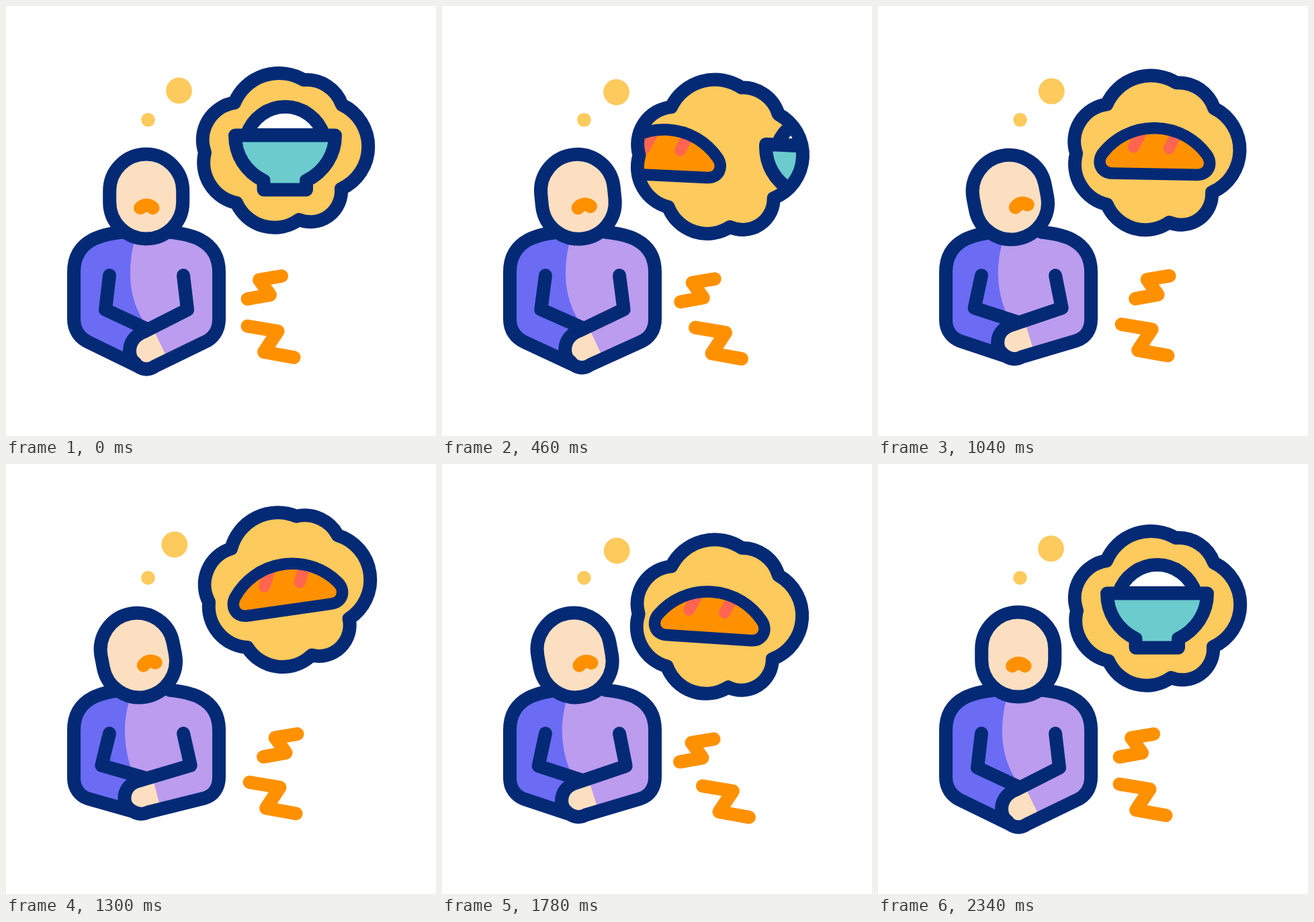
Write an HTML page with a canvas that moves like this. It is 640 px wide and 640 px high and loops after 2.4 s.

```html
<!DOCTYPE html>
<html lang="en">
<head>
<meta charset="utf-8">
<title>Hungry thoughts</title>
<style>
  html, body { margin: 0; width: 100%; height: 100%; overflow: hidden; background: #fff; }
  canvas { display: block; }
</style>
</head>
<body>
<canvas id="stage" width="640" height="640"></canvas>
<script>
const ctx = document.getElementById('stage').getContext('2d');
const LOOP = 2400;
const LINE = 20;
const NAVY = '#042a75', YELLOW = '#fcca5d', TEAL = '#6bcbcd', ORANGE = '#ff9100',
      SKIN = '#fcdfc0', BLUE = '#6b6bf4', PURPLE = '#bb9cef', RED = '#ff6550';

const PIVOT = [211.5, 169.5];   // the thought swings around the small dot
const NECK = [208.5, 346];
const GAP = 220;                // distance between the two dishes

// Each track is a list of [time, value] keys, eased between neighbours.
const TRACKS = {
  swing: [[200, 0], [800, 7], [1380, -9], [1820, 4], [2240, 0]],
  slide: [[100, 0], [700, GAP], [1700, GAP], [2305, 0]],
  tilt: [[200, 0], [700, 1], [1700, 1], [2200, 0]],
  bend: [[200, 0], [1470, 1], [1580, 1], [2170, 0]],
  upperX: [[200, 0], [700, -8], [1160, 30], [1680, -6], [2240, 0]],
  upperY: [[200, 0], [700, 8], [1160, -2], [1680, 8], [2240, 0]],
  lowerX: [[200, 0], [700, 33], [1160, -3], [1680, 31], [2240, 0]],
  lowerY: [[200, 0], [700, 4], [1160, -4], [1680, 3], [2240, 0]]
};

const cloud = new Path2D(
  'M340 144A72 72 0 0 1 443 110A56 56 0 0 1 500 147A69 69 0 0 1 499 272' +
  'A46 46 0 0 1 436 318A62 62 0 0 1 343 293A61.5 61.5 0 0 1 296 218A56 56 0 0 1 340 144Z');
const rice = new Path2D('M358.3 192A60 60 0 0 1 472.7 192Z');
const bowl = new Path2D(
  'M341 192.5H490C490 222 473 247 447 260V273.5H383.5V260C357 247 341 222 341 192.5Z');
const loaf = new Path2D(
  'M350 246.5H476C494 246.5 500 229 490 216C474 195 447 178 413 178' +
  'S352 195 336 216C326 229 332 246.5 350 246.5Z');
const cuts = new Path2D('M392 184L381 207M445 184L434 208');
const mouth = new Path2D('M200 300.5Q209.2 292.5 218.5 300.5');
const upperBolt = new Path2D('M410 402L377 407.5L393 430L359.5 436');
const lowerBolt = new Path2D('M359.5 476.5L404.5 484L384 515L428.5 523');
const head = new Path2D();
head.roundRect(154.2, 220.5, 109, 126, 54.5);

function valueAt(keys, t) {
  if (t <= keys[0][0]) return keys[0][1];
  for (let i = 1; i < keys.length; i++) {
    const [t0, v0] = keys[i - 1], [t1, v1] = keys[i];
    if (t < t1) {
      const x = (t - t0) / (t1 - t0);
      return v0 + (v1 - v0) * x * x * (3 - 2 * x);
    }
  }
  return keys[keys.length - 1][1];
}

function fill(path, color) {
  ctx.fillStyle = color;
  ctx.fill(path);
}

function stroke(path, color = NAVY, width = LINE) {
  ctx.strokeStyle = color;
  ctx.lineWidth = width;
  ctx.stroke(path);
}

function dot(x, y, r) {
  const path = new Path2D();
  path.arc(x, y, r, 0, Math.PI * 2);
  fill(path, YELLOW);
}

function group(draw) {
  ctx.save();
  draw();
  ctx.restore();
}

function rotateAround([x, y], degrees) {
  ctx.translate(x, y);
  ctx.rotate(degrees * Math.PI / 180);
  ctx.translate(-x, -y);
}

function drawBowl() {
  fill(rice, '#fff');
  stroke(rice);
  fill(bowl, TEAL);
  stroke(bowl);
}

function drawBread() {
  fill(loaf, ORANGE);
  stroke(cuts, RED, 17);
  stroke(loaf, NAVY, 17.5);
}

function drawThought(swing, slide) {
  rotateAround(PIVOT, swing);
  dot(...PIVOT, 10.3);
  dot(257.5, 126, 19.4);
  fill(cloud, YELLOW);
  group(() => {
    ctx.clip(cloud);
    ctx.translate(slide, 0);
    drawBowl();
    ctx.translate(-GAP, 0);
    drawBread();
  });
  stroke(cloud);
}

function drawBody(bend) {
  const m = (from, to) => from + (to - from) * bend;
  const torso = new Path2D(
    `M174 336.5C150 339 101 345 101 396V${m(466, 468)}
     C101 ${m(482, 483)} ${m(109, 110)} 494 ${m(124, 122)} ${m(501, 498)}
     L${m(196, 188)} ${m(536, 516)}Q${m(209, 200)} ${m(545, 523)} ${m(222, 212)} ${m(536, 517)}
     L${m(294, 296)} ${m(501, 497)}C309 ${m(495, 493)} 317 482 317 466
     V396C317 345 268 339 243 336.5`);
  const rightHalf = new Path2D(
    `M${m(191, 184)} 350C${m(181, 174)} ${m(390, 380)} ${m(180, 172)} ${m(440, 420)}
     ${m(213, 190)} ${m(480, 465)}L205 500L210 545H330V330H${m(195, 188)}Z`);
  const hand = new Path2D(
    `M${m(184, 176)} ${m(514, 497)}L${m(200, 192)} ${m(489, 475)}
     L${m(222, 219)} ${m(487, 470)}L${m(239, 229)} ${m(522, 509)}
     L${m(210, 202)} ${m(540, 520)}L${m(192, 184)} ${m(531, 514)}Z`);
  const arms = new Path2D(
    `M154 401L${m(148, 142)} ${m(452, 448.5)}L${m(208, 205)} ${m(480, 466)}
     M264 401L${m(270, 275)} ${m(452, 448.5)}L${m(205, 197)} ${m(485, 471)}
     C${m(190, 182)} ${m(491, 475)} ${m(184, 176)} ${m(502, 486)} ${m(184, 176)} ${m(514, 497)}
     Q${m(184, 176)} ${m(526, 508)} ${m(193, 185)} ${m(532, 514)}`);

  fill(torso, BLUE);
  group(() => {
    ctx.clip(torso);
    fill(rightHalf, PURPLE);
    fill(hand, SKIN);
  });
  stroke(torso);
  stroke(arms);
}

function drawHead(tilt) {
  rotateAround(NECK, -11 * tilt);
  fill(head, SKIN);
  stroke(head);
  ctx.translate(13.5 * tilt, -tilt);
  rotateAround([209, 298], -2 * tilt);
  stroke(mouth, ORANGE);
}

function drawBolt(path, x, y) {
  ctx.translate(x, y);
  stroke(path, ORANGE);
}

function render(now) {
  const t = now % LOOP;
  const v = {};
  for (const name in TRACKS) v[name] = valueAt(TRACKS[name], t);

  ctx.fillStyle = '#fff';
  ctx.fillRect(0, 0, 640, 640);
  ctx.lineCap = ctx.lineJoin = 'round';
  group(() => drawThought(v.swing, v.slide));
  group(() => drawBody(v.bend));
  group(() => drawHead(v.tilt));
  group(() => drawBolt(upperBolt, v.upperX, v.upperY));
  group(() => drawBolt(lowerBolt, v.lowerX, v.lowerY));
}

let start;
function tick(now) {
  start ??= now;
  render(now - start);
  requestAnimationFrame(tick);
}
render(0);
requestAnimationFrame(tick);
</script>
</body>
</html>
```
